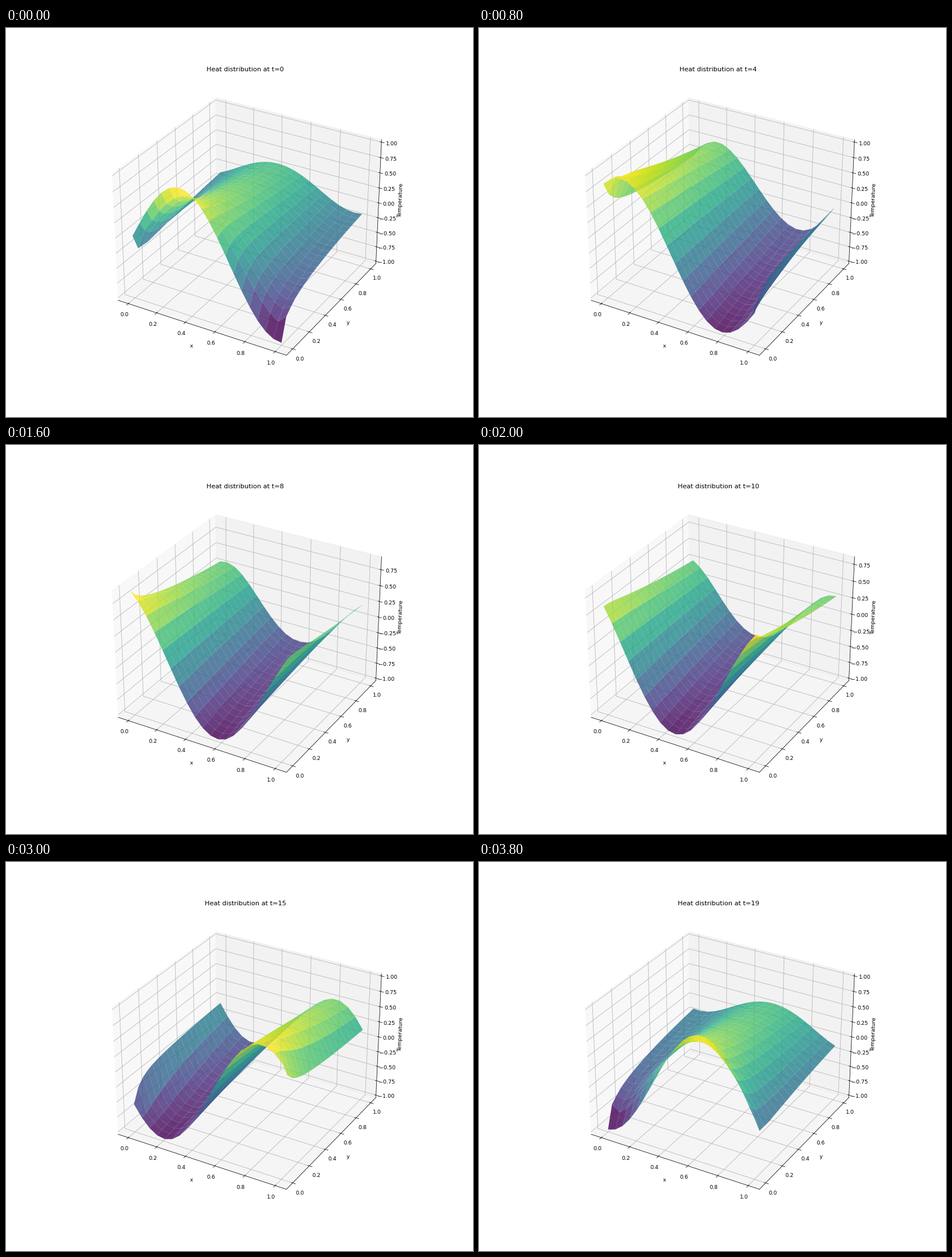
Recreate the animation shown at these times as a matplotlib script. Size 820 by 683 pixels, loop 4000 ms.

```python
import numpy as np
import matplotlib.pyplot as plt
from matplotlib.animation import FuncAnimation

N = 20             # grid points per axis, also number of frames
RATE = 0.0005 * (N - 1) ** 2
PAD = 1 / 48


def diffuse(field, steps):
    """Explicit heat equation on a periodic grid, one layer per step."""
    layers = [field]
    for _ in range(steps - 1):
        u = layers[-1]
        lap = sum(np.roll(u, d, axis) for d in (-1, 1) for axis in (0, 1)) - 4 * u
        layers.append(u + RATE * lap)
    return np.array(layers)


idx = np.arange(N)
heat = diffuse(np.sin(0.25 * (idx[:, None] + idx)), N)
X, Y = np.meshgrid(np.linspace(0, 1, N), np.linspace(0, 1, N))

# Slightly above 820/12, so the canvas is 820 x 683 after truncation.
fig = plt.figure(figsize=(12, 10), dpi=68.334)
ax = fig.add_subplot(projection="3d")


def draw(t):
    z = heat[:, t, :]
    ax.clear()
    surf = ax.plot_surface(X, Y, z, cmap="viridis", alpha=0.8)
    ax.set_xlim(-0.05, 1.05, view_margin=PAD)
    ax.set_ylim(-0.05, 1.05, view_margin=PAD)
    ax.set_zlim(z.min(), z.max(), view_margin=PAD)
    ax.set_xlabel("x")
    ax.set_ylabel("y")
    ax.set_zlabel("Temperature")
    ax.set_title(f"Heat distribution at t={t}")
    return surf,


anim = FuncAnimation(fig, draw, frames=N, interval=200, repeat=True, repeat_delay=0)
plt.show()
```
